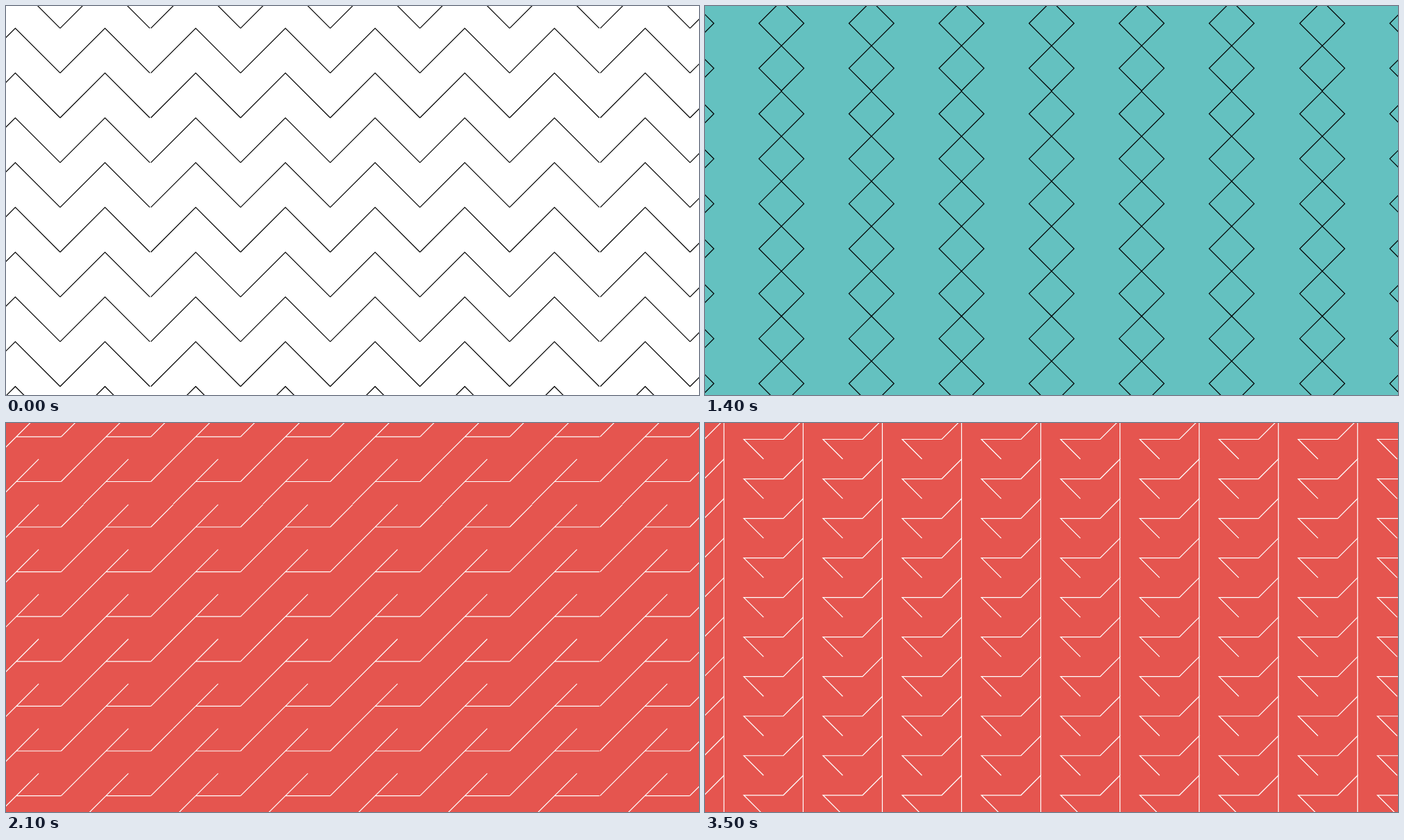
Animation, 998 px wide and 561 px high, one loop 4.2 s. Source, as an HTML page with a canvas:

```html
<!DOCTYPE html>
<html lang="en">
<head>
<meta charset="utf-8">
<title>Line patterns</title>
<style>
  html, body { margin: 0; width: 100%; height: 100%; overflow: hidden; }
  canvas { display: block; }
</style>
</head>
<body>
<canvas width="998" height="561"></canvas>
<script>
const canvas = document.querySelector('canvas');
const ctx = canvas.getContext('2d');
const HOLD = 700;

// Every tile is 4 x 2 units. A seam widens the grid by `gap` px before that column or row.
const scenes = [
  { back: '#fff', ink: '#000', unit: 32.29, x: -51.2, y: -32.5, gap: 1.5, seamCols: [2, 7],
    tile: 'M0 2L2 0L4 2' },
  { back: '#1d1d1b', ink: '#fff', unit: 32.55, x: 9, y: 10.3, gap: 0.7, seamRows: [1],
    tile: 'M1 0V2M3 0V2M0 1L1 2M2 1L3 0' },
  { back: '#64c1c0', ink: '#000', unit: 32.42, x: 45.2, y: -7.4, gap: 0.8, seamCols: [6], seamRows: [2],
    tile: 'M2 0L3 1L2 2L1 1Z' },
  { back: '#e5554f', ink: '#fff', unit: 32.3, x: -49.8, y: -12.4, gap: 0.9, seamCols: [7], seamRows: [2],
    tile: 'M2 1H4M0 1L1 0M1 2L3 0' },
  { back: '#c8c8c8', ink: '#000', unit: 32.33, x: -51.1, y: -8, gap: 0.8, seamRows: [1],
    tile: 'M0 1H4M1 0L3 2' },
  { back: '#e5554f', ink: '#fff', unit: 28.515, x: 27.3, y: -5, gap: 0,
    tile: 'M2 2L1 1H3L4 0V2' }
];

function drawScene({ back, ink, unit, x, y, gap, tile, seamCols = [], seamRows = [] }) {
  const path = new Path2D(tile);
  const shift = (seams, i) => gap * seams.filter(seam => seam <= i).length;

  ctx.setTransform(1, 0, 0, 1, 0, 0);
  ctx.fillStyle = back;
  ctx.fillRect(0, 0, canvas.width, canvas.height);
  ctx.strokeStyle = ink;
  ctx.lineWidth = 1.2 / unit;

  for (let row = -1; row < 11; row++) {
    for (let col = -1; col < 10; col++) {
      ctx.setTransform(unit, 0, 0, unit,
        x + col * 4 * unit + shift(seamCols, col),
        y + row * 2 * unit + shift(seamRows, row));
      ctx.stroke(path);
    }
  }
}

let shown = -1;
function render() {
  const index = Math.floor(performance.now() / HOLD) % scenes.length;
  if (index !== shown) drawScene(scenes[shown = index]);
  requestAnimationFrame(render);
}
render();
</script>
</body>
</html>
```
